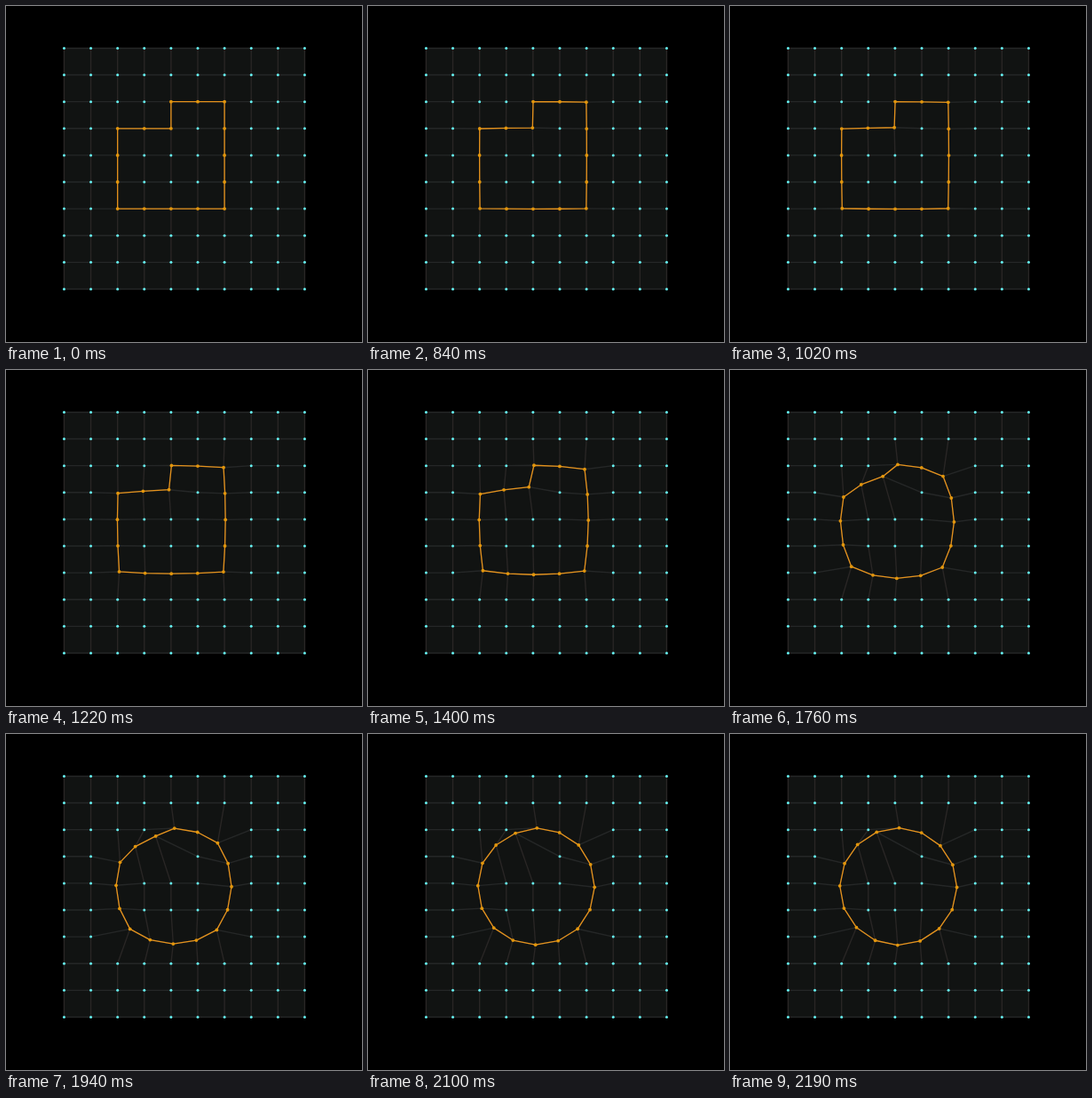
Animation of 401x378 px, one loop 7470 ms. Source, as an HTML page with a canvas:

```html
<!DOCTYPE html>
<html lang="en">
<head>
<meta charset="utf-8">
<title>Grid loop relaxing into a circle</title>
<style>
  html, body { margin: 0; width: 100%; height: 100%; overflow: hidden; background: #000; }
  canvas { display: block; }
</style>
</head>
<body>
<canvas id="stage" width="401" height="378"></canvas>
<script>
const ctx = document.getElementById('stage').getContext('2d');
const LOOP = 7470, N = 10, GAP = 30.11, LEFT = 65.45, TOP = 47.45;
const MID = 4.125, RADIUS = 2.19, TURN = 0.013;

// The picture advances only at these moments (ms).
const TICKS = [840, 930, 1030, 1130, 1220, 1310, 1400, 1490, 1580,
               1670, 1760, 1850, 1940, 2010, 2100, 2190];

// Loop nodes as column,row, clockwise from the top.
const ring = '42 52 62 63 64 65 66 56 46 36 26 25 24 23 33 43'
  .split(' ').map(s => [+s[0], +s[1]]);

function progress(t) {
  if (t < TICKS[0]) return 0;
  if (t < 1600) return 0.485 * 2 ** ((t - 1600) / 180);
  return 1 - 0.515 * Math.max(0, 1 - (t - 1600) / 590) ** 1.33;
}

function makeNodes(p) {
  const nodes = Array.from({ length: N }, (_, r) =>
    Array.from({ length: N }, (_, c) => ({ x: c, y: r })));
  ring.forEach(([c, r], i) => {
    const a = i * Math.PI / 8 - Math.PI / 2 + TURN;
    nodes[r][c] = {
      x: c + (MID + RADIUS * Math.cos(a) - c) * p,
      y: r + (MID + RADIUS * Math.sin(a) - r) * p,
      onRing: true
    };
  });
  nodes.flat().forEach(n => {
    n.x = LEFT + n.x * GAP;
    n.y = TOP + n.y * GAP;
  });
  return nodes;
}

function line(points, color, width, closed) {
  ctx.beginPath();
  points.forEach(n => ctx.lineTo(n.x, n.y));
  if (closed) ctx.closePath();
  ctx.strokeStyle = color;
  ctx.lineWidth = width;
  ctx.stroke();
}

function dot(n) {
  ctx.beginPath();
  ctx.arc(n.x, n.y, n.onRing ? 1.9 : 1.5, 0, 2 * Math.PI);
  ctx.fillStyle = n.onRing ? '#e2960c' : '#66f2f2';
  ctx.fill();
}

function draw(t) {
  const now = TICKS.filter(k => k <= t).pop() ?? 0;
  const nodes = makeNodes(progress(now));
  const size = GAP * (N - 1);
  ctx.fillStyle = '#000';
  ctx.fillRect(0, 0, 401, 378);
  ctx.fillStyle = '#111312';
  ctx.fillRect(LEFT, TOP, size, size);
  ctx.lineJoin = 'round';
  for (let i = 0; i < N; i++) {
    line(nodes[i], '#252727', 1.4);
    line(nodes.map(row => row[i]), '#292625', 1.4);
  }
  line(ring.map(([c, r]) => nodes[r][c]), '#e5921c', 1.3, true);
  nodes.flat().forEach(dot);
}

const start = performance.now();
function frame() {
  draw((performance.now() - start) % LOOP);
  requestAnimationFrame(frame);
}
frame();
</script>
</body>
</html>
```
